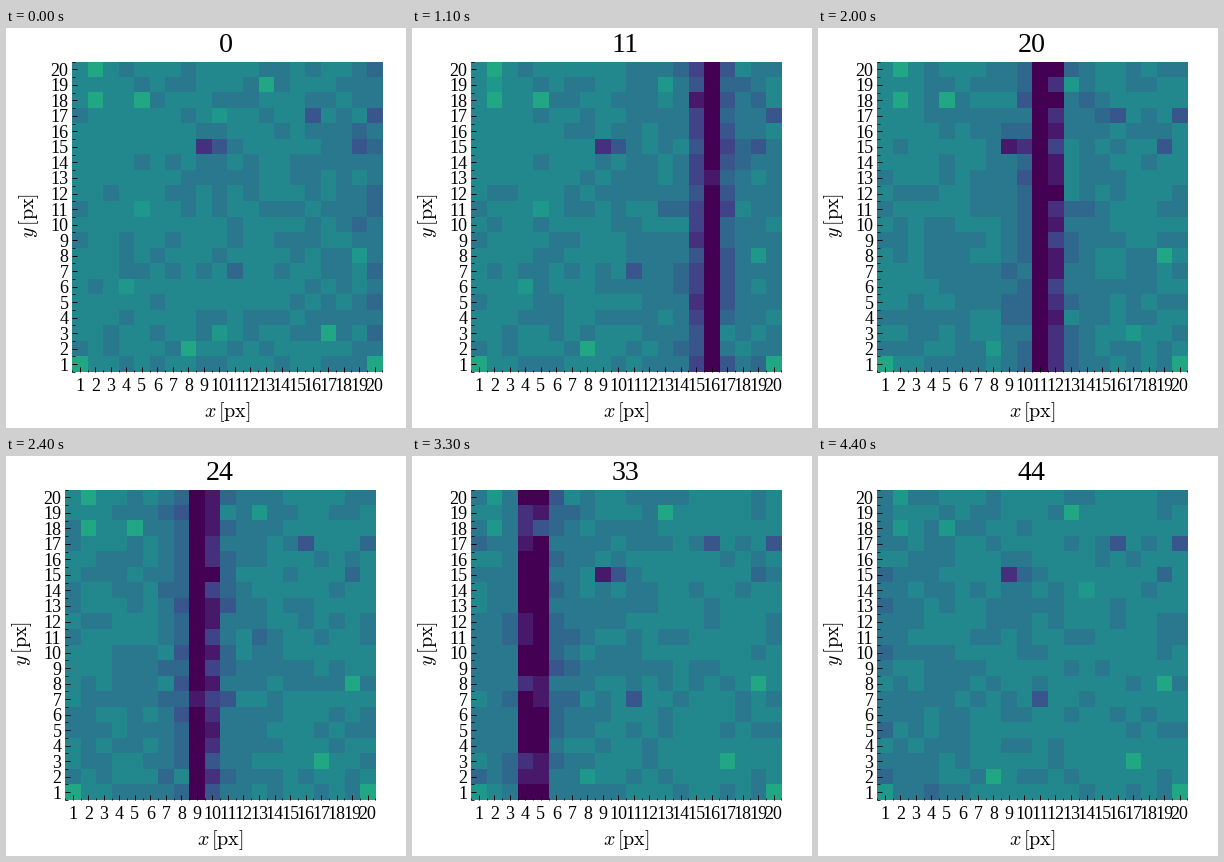
Write a matplotlib script that moves like this. It is 400 px wide and 400 px high and loops after 4.5 s.

```python
import matplotlib.pyplot as plt
import numpy as np
from matplotlib.animation import FuncAnimation
from matplotlib.ticker import MultipleLocator

plt.rcParams.update({"font.family": "Liberation Serif", "mathtext.fontset": "cm"})

N = 20
STAGE, SIDE = 400, 310.4
BOTTOM = 56
FRAMES, INTERVAL = 45, 100
DPI = 100
LEVELS = 16
COLS = np.arange(1, N + 1)

# A few defective pixels as (column, row).
HOT = [(2, 20), (2, 18), (5, 18), (8, 2), (1, 1), (20, 1), (19, 8), (17, 3), (13, 19)]
DIM = [(10, 15), (11, 7), (16, 17), (20, 17), (19, 15)]
DEAD = (9, 15)


def px(size):
    return size * 72 / DPI


def fixed_pattern():
    field = .452 + np.random.default_rng(7).normal(0, .022, (N, N))
    for pixels, level in ((HOT, .59), (DIM, .3), ([DEAD], .13)):
        for col, row in pixels:
            field[row - 1, col - 1] = level
    return field


BASE = fixed_pattern()


def exposure(k):
    """Sensor levels while a dark band sweeps from right to left."""
    rng = np.random.default_rng(100 + k)
    dist = np.abs(COLS - (18.5 - .515 * (k - 6)))
    core = np.exp(-(dist / .95) ** 2.5)
    near = np.exp(-dist / 3.5)
    depth = .47 + rng.normal(0, .05, (N, 1)) + rng.normal(0, .05, (N, N))
    noise = rng.normal(0, 1, (N, N)) * (.008 + .03 * near)
    field = BASE + noise - depth * core - .09 * near
    return np.clip(np.rint(field * (LEVELS - 1)), 0, LEVELS - 1)


def place_axes(left):
    ax.set_position(np.array([left, BOTTOM, SIDE, SIDE]) / STAGE)


fig = plt.figure(figsize=(STAGE / DPI, STAGE / DPI), dpi=DPI, facecolor="white")
ax = fig.add_axes([0, 0, 1, 1])
place_axes(66)
image = ax.imshow(exposure(0), origin="lower", extent=(.5, N + .5, .5, N + .5),
                  cmap=plt.get_cmap("viridis", LEVELS), vmin=-.5, vmax=LEVELS - .5,
                  interpolation="nearest", aspect="auto")
ax.spines[:].set_visible(False)

for axis in (ax.xaxis, ax.yaxis):
    axis.set_ticks(COLS, [str(c) for c in COLS])
    axis.set_minor_locator(MultipleLocator(.5))
ax.tick_params(which="major", direction="in", length=px(5), width=px(1),
               labelsize=px(18))
ax.tick_params(which="minor", direction="in", length=px(2.5), width=px(.8))
ax.tick_params(axis="x", pad=px(6))
ax.tick_params(axis="y", pad=px(3.5))


def label(x, y, text, size, **kw):
    """Place text at a pixel offset from the plot's lower left corner."""
    return ax.text(x / SIDE, y / SIDE, text, fontsize=px(size), ha="center",
                   va="baseline", transform=ax.transAxes, **kw)


title = label(154.3, 320, "0", 28)
label(155, -45, r"$x\,\mathrm{[px]}$", 20)
label(-37.5, 156.3, r"$y\,\mathrm{[px]}$", 20, rotation=90, rotation_mode="anchor")


def update(k):
    place_axes(66 if k == 0 else 59)
    image.set_data(exposure(k))
    title.set_text(str(k))
    return image, title


anim = FuncAnimation(fig, update, frames=FRAMES, interval=INTERVAL,
                     repeat=True, repeat_delay=0, blit=False)
plt.show()
```
